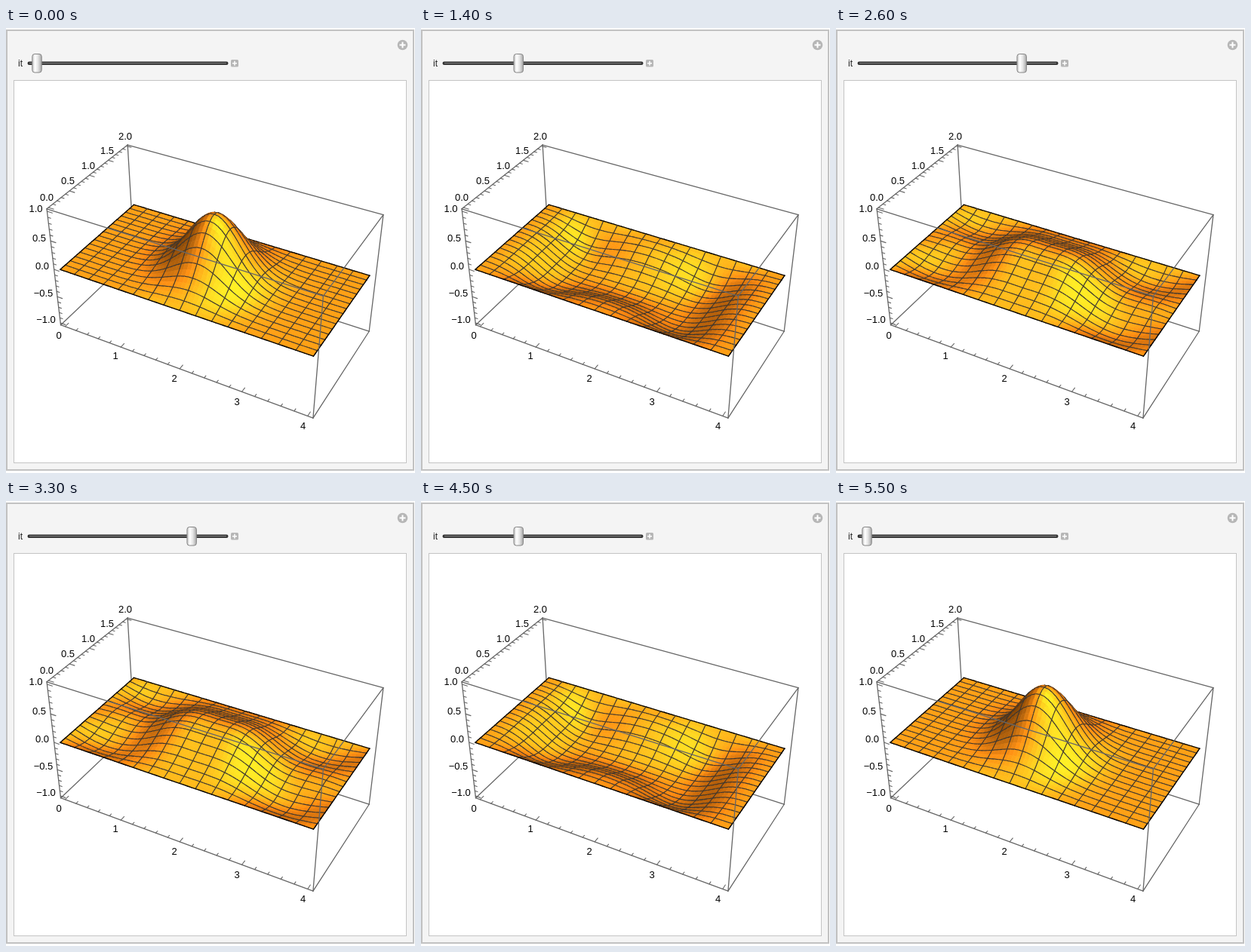
An HTML page with a canvas for the animation above (6 s loop, 542 px wide and 590 px high).

```html
<!DOCTYPE html>
<html lang="en">
<head>
<meta charset="utf-8">
<title>Wave on a rectangular membrane</title>
<style>
  html, body { margin: 0; width: 100%; height: 100%; overflow: hidden; background: #fff; }
  svg, canvas { position: absolute; left: 0; top: 0; width: 542px; height: 590px; }
  text { font: 13px "Liberation Sans", Arial, sans-serif; text-anchor: middle; fill: #000; }
  text.name { font-size: 12px; text-anchor: start; fill: #222; }
</style>
</head>
<body>
<svg viewBox="0 0 542 590">
  <defs>
    <linearGradient id="knob">
      <stop offset="0" stop-color="#c4c4c4"/>
      <stop offset=".3" stop-color="#fff"/>
      <stop offset=".6" stop-color="#e6e6e6"/>
      <stop offset="1" stop-color="#a8a8a8"/>
    </linearGradient>
  </defs>
  <rect x="1" y="3" width="539" height="583" fill="#f4f4f4" stroke="#c2c2c2" stroke-width="2"/>
  <rect x="10.5" y="69.5" width="520" height="507" fill="#fff" stroke="#c4c4c4"/>
  <circle cx="525.5" cy="22.5" r="6.8" fill="#b6b6b6"/>
  <path d="M521.5 22.5h8M525.5 18.5v8" stroke="#fff" stroke-width="2"/>
  <text class="name" x="16" y="51">it</text>
  <rect x="28.5" y="44.5" width="266" height="4.4" rx="2.2" fill="#333"/>
  <path d="M31 46.7H292" stroke="#777" stroke-width="1.2"/>
  <rect x="298" y="42" width="10" height="9.5" rx="1.5" fill="#b6b6b6"/>
  <path d="M300 46.7h6M303 43.7v6" stroke="#fff" stroke-width="1.5"/>
  <g id="thumb">
    <rect x="-6.2" y="34.5" width="12.4" height="24.5" rx="3.2" fill="url(#knob)" stroke="#858585"/>
  </g>
  <g id="labels"></g>
</svg>
<canvas id="plot" width="542" height="590"></canvas>
<script>
const ctx = document.getElementById('plot').getContext('2d');
const thumb = document.getElementById('thumb');
const labels = document.getElementById('labels');
const { PI, cos, sin, exp, hypot, max, min, floor } = Math;

// Camera: right, up and toward-viewer axes in box space
const RIGHT = [0.8793, 0.47628, 0];
const UP = [-0.28151, 0.51971, 0.80663];
const BACK = [0.38418, -0.70926, 0.59105];
const DIST = 3.3838, ZOOM = 1291.5, SPAN = 4.16;
const dot = (a, b) => a[0] * b[0] + a[1] * b[1] + a[2] * b[2];
const unit = v => { const l = hypot(...v); return v.map(c => c / l); };

function project(x, y, z) {
  const p = [(x - 2) / SPAN, (y - 1) / SPAN, z / SPAN];
  const s = ZOOM / (DIST - dot(BACK, p));
  return [276 + dot(RIGHT, p) * s, 324.2 - dot(UP, p) * s];
}

// Shading: coloured ambient, three directional lights, soft white highlight
const LIGHTS = [[1.5, -0.5, 1.5], [1.5, 1.5, 1.5], [-0.5, 1.5, 1.5]].map(unit);
const HALVES = LIGHTS.map(([x, y, z]) => unit([x, y, z + 1]));
const BASE = [0.8807, 0.611, 0.142];
const AMBIENT = [0.301, 0.2241, 0.0905];
const LAMP = [0.2642, 0.1833, 0.0426];

function shade(gx, gy) {
  const n = unit([-gx, -gy, 1]);
  const v = [dot(RIGHT, n), dot(UP, n), dot(BACK, n)];
  let diff = 0, spec = 0;
  LIGHTS.forEach((l, i) => {
    const d = dot(l, v);
    if (d <= 0) return;
    diff += d;
    spec += max(0, dot(HALVES[i], v)) ** 3;
  });
  const rgb = BASE.map((b, i) =>
    min(255, 278 * (AMBIENT[i] * b + LAMP[i] * (b * diff + spec))) | 0);
  return `rgb(${rgb})`;
}

// Standing modes of a 4 x 2 sheet with fixed edges, started as a Gaussian bump.
// Frequencies follow a finite-difference grid of pitch H.
const NX = 64, NY = 32, DX = 4 / NX, DY = 2 / NY, SHARP = 3, H = 0.2, DT = 0.0497;
const onGrid = k => 2 / H * sin(k * H / 2);
const modes = [];
for (let m = 1; m < 16; m += 2) {
  for (let n = 1; n < 10; n += 2) {
    const p = m * PI / 4, q = n * PI / 2;
    const amp = PI / SHARP / 2 * exp(-(p * p + q * q) / (4 * SHARP));
    modes.push({ p, q, w: hypot(onGrid(p), onGrid(q)), amp });
  }
}

function heights(time) {
  const now = modes.map(o => ({ ...o, c: o.amp * cos(o.w * time) }));
  const grid = [];
  for (let i = 0; i <= NX; i++) {
    const row = grid[i] = [];
    const cx = now.map(o => o.c * cos(o.p * (i * DX - 2)));
    for (let j = 0; j <= NY; j++) {
      row[j] = now.reduce((sum, o, k) => sum + cx[k] * cos(o.q * (j * DY - 1)), 0);
    }
  }
  return grid;
}

function line(a, b, color, width) {
  ctx.strokeStyle = color;
  ctx.lineWidth = width;
  ctx.beginPath();
  ctx.moveTo(...a);
  ctx.lineTo(...b);
  ctx.stroke();
}

function drawSurface(time) {
  const h = heights(time);
  const pts = h.map((row, i) => row.map((z, j) => project(i * DX, j * DY, z)));
  const edge = (a, b, k, step, last) => {
    if (k === 0 || k === last) line(a, b, '#000', 1.4);
    else if (k % step === 0) line(a, b, '#3a3632', 1.05);
  };
  for (let j = NY - 1; j >= 0; j--) {
    for (let i = 0; i < NX; i++) {
      const a = pts[i][j], b = pts[i + 1][j], c = pts[i + 1][j + 1], d = pts[i][j + 1];
      const ha = h[i][j], hb = h[i + 1][j], hc = h[i + 1][j + 1], hd = h[i][j + 1];
      const fill = shade((hb + hc - ha - hd) / (2 * DX), (hc + hd - ha - hb) / (2 * DY));
      ctx.fillStyle = ctx.strokeStyle = fill;
      ctx.lineWidth = 0.7;
      ctx.beginPath();
      for (const p of [a, b, c, d]) ctx.lineTo(...p);
      ctx.closePath();
      ctx.fill();
      ctx.stroke();
      edge(d, c, j + 1, 2, NY);
      edge(a, d, i, 4, NX);
      edge(b, c, i + 1, 4, NX);
      edge(a, b, j, 2, NY);
    }
  }
}

// Bounding box and ticks
const X = [-0.08, 4.08], Y = [-0.04, 2.04], Z = [-1.04, 1.04];
const GRAY = '#666';
function boxEdges(list) {
  for (const pair of list.split(' ')) {
    const [a, b] = pair.split('-').map(s => project(X[s[0]], Y[s[1]], Z[s[2]]));
    line(a, b, GRAY, 1.3);
  }
}

function ticks(from, count, step, major, at, dir) {
  for (let i = 0; i <= count; i++) {
    const p = at(from + i * step);
    const len = i % major ? 0.05 : 0.09;
    line(project(...p), project(...p.map((c, k) => c + dir[k] * len)), GRAY, 1.1);
  }
}

function draw(it) {
  ctx.clearRect(0, 0, 542, 590);
  ctx.lineCap = 'round';
  ctx.lineJoin = 'round';
  boxEdges('011-111 011-010 010-110 010-000 111-110');
  // The first two iterations lie half a step either side of rest
  drawSurface(it ? (it - 1.5) * DT : 0);
  boxEdges('001-101 001-000 000-100 101-100 101-111 001-011 100-110');
  ticks(0, 20, 0.2, 5, v => [v, Y[0], Z[0]], [0, 1, 0]);
  ticks(0, 20, 0.1, 5, v => [X[0], v, Z[1]], [1, 0, 0]);
  ticks(-1, 20, 0.1, 5, v => [X[0], Y[0], v], [1, 0, 0]);
  thumb.setAttribute('transform', `translate(${max(41, 39.1 + 2.436 * it)} 0)`);
}

function label(str, x, y) {
  const t = document.createElementNS('http://www.w3.org/2000/svg', 'text');
  t.setAttribute('x', x);
  t.setAttribute('y', y + 4.7);
  t.textContent = str;
  labels.append(t);
}
[[70, 407], [145, 434.5], [223, 464], [306, 495], [393.5, 527]].forEach((p, i) => label(i, ...p));
[[54, 224.5], [82, 202.5], [109, 182], [134, 162], [158, 143]].forEach((p, i) => label((i / 2).toFixed(1), ...p));
[[53, 386], [49.5, 351], [48, 315], [44, 278], [39.5, 239]].forEach((p, i) =>
  label((i / 2 - 1).toFixed(1).replace('-', '\u2212'), ...p));

// Up through 25 steps, a short rest, then back down
function stepAt(t) {
  if (t < 500) return 0;
  if (t < 3100) return min(25, 1 + floor((t - 500) / 100));
  return max(0, 24 - floor((t - 3100) / 100));
}

let shown = -1;
function frame() {
  const k = stepAt(performance.now() % 6000);
  if (k !== shown) {
    shown = k;
    draw(max(0, 4 * k - 3));
  }
  requestAnimationFrame(frame);
}
frame();
</script>
</body>
</html>
```
